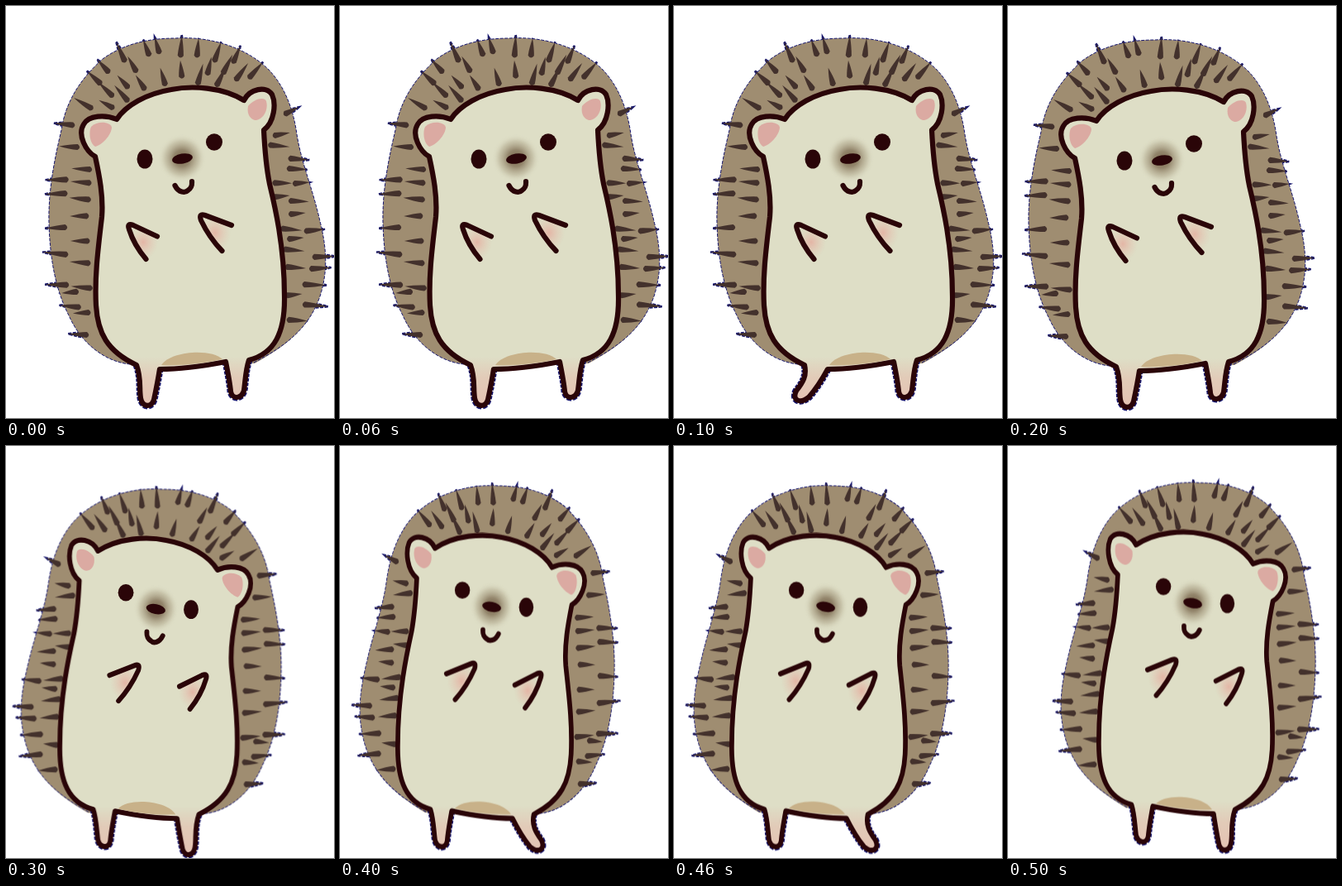
An HTML page for the animation above (600 ms loop, 397 px wide and 498 px high).

```html
<!DOCTYPE html>
<html lang="en">
<head>
<meta charset="utf-8">
<title>Dancing hedgehog</title>
<style>
  html, body { margin: 0; width: 100%; height: 100%; overflow: hidden; background: #fff; }
  svg { display: block; width: 100%; height: 100%; }
  .ink { fill: none; stroke: #2a0508; stroke-width: 6.2; stroke-linecap: round; stroke-linejoin: round; }
  .dot { fill: #2a0508; }
  .fringe { fill: none; stroke: #17176f; stroke-dasharray: 4 1.5; }
  .quill { fill: #43312c; }
  .kick { opacity: 0; }
</style>
</head>
<body>
<svg viewBox="0 0 397 498">
  <defs>
    <linearGradient id="skin" gradientUnits="userSpaceOnUse" x1="0" y1="424" x2="0" y2="474">
      <stop offset="0" stop-color="#dedec6"/>
      <stop offset=".5" stop-color="#e2cbb8"/>
      <stop offset="1" stop-color="#e4c4b4"/>
    </linearGradient>
    <radialGradient id="muzzle">
      <stop offset="0" stop-color="#75634a"/>
      <stop offset=".35" stop-color="#86765c" stop-opacity=".85"/>
      <stop offset=".7" stop-color="#a59a7e" stop-opacity=".4"/>
      <stop offset="1" stop-color="#dedec6" stop-opacity="0"/>
    </radialGradient>
    <radialGradient id="blush">
      <stop offset="0" stop-color="#e3b5a5"/>
      <stop offset="1" stop-color="#e3c6b4" stop-opacity="0"/>
    </radialGradient>
  </defs>

  <g id="hog">
    <g id="under"></g>
    <path id="shell" fill="#9f8d71" d="M205 39 C250 36 293 52 318 77 C338 98 348 126 352 155
      C357 188 371 220 380 260 C388 292 390 320 380 351 C368 385 345 408 301 432
      L150 433 C120 430 91 408 76 374 C60 343 53 305 52 262 C51 220 60 180 67 150
      C72 116 90 88 117 64 C142 46 172 39 205 39Z"/>
    <path class="fringe" d="M300 431 C345 408 368 385 380 351 C390 320 388 292 380 260
      C371 220 357 188 352 155 C348 126 338 98 318 77 C293 52 250 36 205 39
      C172 39 142 46 117 64 C90 88 72 116 67 150 C60 180 51 220 52 262
      C53 305 60 343 76 374 C91 408 120 430 150 433"/>
    <g id="quills"></g>

    <g id="still"></g>
    <g id="kick" class="kick"></g>

    <path fill="#c8b189" d="M188 434 C200 416 250 414 262 427 C240 432 212 435 188 434Z"/>
    <path fill="#dbaaa2" d="M103 146 C111 138 127 140 128 147 C127 157 116 168 108 170 C101 166 100 152 103 146Z"/>
    <path fill="#dbaaa2" d="M293 121 C300 112 313 109 315 115 C318 126 311 137 303 138 C297 138 291 132 293 121Z"/>

    <circle cx="213" cy="184" r="29" fill="url(#muzzle)"/>
    <ellipse class="dot" cx="168" cy="185" rx="9.5" ry="11.5"/>
    <ellipse class="dot" cx="252" cy="164.5" rx="10" ry="10.2"/>
    <ellipse class="dot" cx="213.5" cy="184.5" rx="12.5" ry="6" transform="rotate(-10 213.5 184.5)"/>
    <path class="ink" stroke-width="5" d="M204.500 217 C209 226 217 226 220 223 C226 219 225 215 225 212"/>

    <path fill="url(#blush)" d="M148 265 L183 279 L184 306 L170 306Z"/>
    <path class="ink" d="M183 278.500 L154 265 Q146 262 149 270 Q155 289 169.500 306"/>
    <path fill="url(#blush)" d="M234 252 L272 265 L271 296 L261 296Z"/>
    <path class="ink" d="M273 265 L241 253 Q233 250 236 259 Q246 280 261.500 296"/>
  </g>
</svg>

<script>
const $ = id => document.getElementById(id);
const NS = "http://www.w3.org/2000/svg";

function add(parent, cls, d, more = {}) {
  const p = document.createElementNS(NS, "path");
  p.setAttribute("d", d);
  if (cls) p.setAttribute("class", cls);
  for (const k in more) p.setAttribute(k, more[k]);
  parent.append(p);
}

// Quill centres; direction and length follow from the place on the back
const crown = [
  [118,73], [139,56], [170,51], [183,48], [212,49], [232,51], [256,56], [279,59], [302,78],
  [153,71], [107,87], [121,101], [94,118], [122,119], [142,92], [140,106], [163,93],
  [190,86], [212,77], [235,83], [246,73], [260,86], [268,71], [285,80]
];
const flanks = [
  [71,143], [77,170], [92,197], [62,210], [91,213], [61,227], [90,233], [89,254], [61,268],
  [90,284], [60,299], [90,310], [62,337], [78,346], [92,340], [78,363], [92,371], [88,397],
  [345,127], [333,155], [330,169], [354,185], [352,197], [334,214], [357,214], [333,230],
  [354,236], [352,251], [345,270], [373,271], [350,281], [348,295], [384,303], [350,316],
  [380,317], [373,337], [348,349], [374,362], [352,380]
];

function quill([x, y], i, side) {
  const wave = Math.sin(i * 2.3 + y);
  const rim = Math.abs(x - 217) > 142;
  const len = side ? 24 + 3 * wave + (rim ? 5 : 0) : 25 + 3 * wave;
  const a = Math.atan2(Math.min(0, y - 165) * 1.3, x - 215) + wave * (side ? 0.1 : 0.08);
  const c = Math.cos(a), s = Math.sin(a), h = len / 2;
  const at = (u, v) => `${(x + u * c - v * s).toFixed(1)} ${(y + u * s + v * c).toFixed(1)}`;
  return `M${at(h, 0)} Q${at(0, 3)} ${at(3 - h, 3.6)} Q${at(-h - 2, 0)} ${at(3 - h, -3.6)} Q${at(0, -3)} ${at(h, 0)}Z`;
}

function plant(list, side) {
  list.forEach((q, i) => {
    const d = quill(q, i, side);
    add($("under"), "fringe", d, { "stroke-width": 2.4 });
    add($("quills"), "quill", d);
  });
}
plant(crown, false);
plant(flanks, true);

function body(leg) {
  return `M108 182 C113 205 118 230 116 255 C112 290 107 325 109 362
    C111 395 122 417 158 434 ${leg}
    C215 439 240 435 266 430 C269 445 271 455 272 466 C274 476 285 475 288 465
    C290 450 290 440 294 428 C325 420 338 395 337 350 C337 290 325 240 319 215
    C314 190 313 170 312 150 C325 140 327 118 322 107 C315 96 295 100 288 114
    C262 98 225 96 200 101 C170 106 145 120 134 137
    C120 131 100 132 94 143 C86 156 97 176 108 182Z`;
}

const legs = {
  still: "C164 450 161 462 163 474 C165 485 176 486 179 476 C182 462 184 452 186 439",
  kick: "C161 447 156 455 148 465 C142 477 153 481 163 473 C171 464 179 452 186 439"
};
// The head and flank outline is open between the ear ends and the cheeks
for (const pose in legs) {
  const d = body(legs[pose]), g = $(pose);
  add(g, "fringe", `M158 434 ${legs[pose]}`, { "stroke-width": 9 });
  add(g, "fringe", "M266 430 C269 445 271 455 272 466 C274 476 285 475 288 465 C290 450 290 440 294 428", { "stroke-width": 9 });
  add(g, "", d, { fill: "url(#skin)" });
  add(g, "ink", d);
}

// One row per beat: x scale, y scale, x shift, y shift, leg kicked out
const beats = [
  [1, 1, 0, 0, 0],
  [1, 1, 0, 0, 1],
  [1, 1, -27, 2, 0],
  [-0.94, 0.995, 382, 13.5, 0],
  [-0.92, 1.005, 380, 9, 1],
  [-0.92, 1, 420, 5.5, 0]
];

function play(el, toFrame) {
  const rows = [...beats, beats[0]];
  const frames = rows.map((b, i) => ({ ...toFrame(b), offset: i / beats.length, easing: "step-end" }));
  el.animate(frames, { duration: 600, iterations: Infinity }).startTime = 0;
}
play($("hog"), ([sx, sy, x, y]) => ({ transform: `matrix(${sx}, 0, 0, ${sy}, ${x}, ${y})` }));
play($("still"), b => ({ opacity: 1 - b[4] }));
play($("kick"), b => ({ opacity: b[4] }));
</script>
</body>
</html>
```
